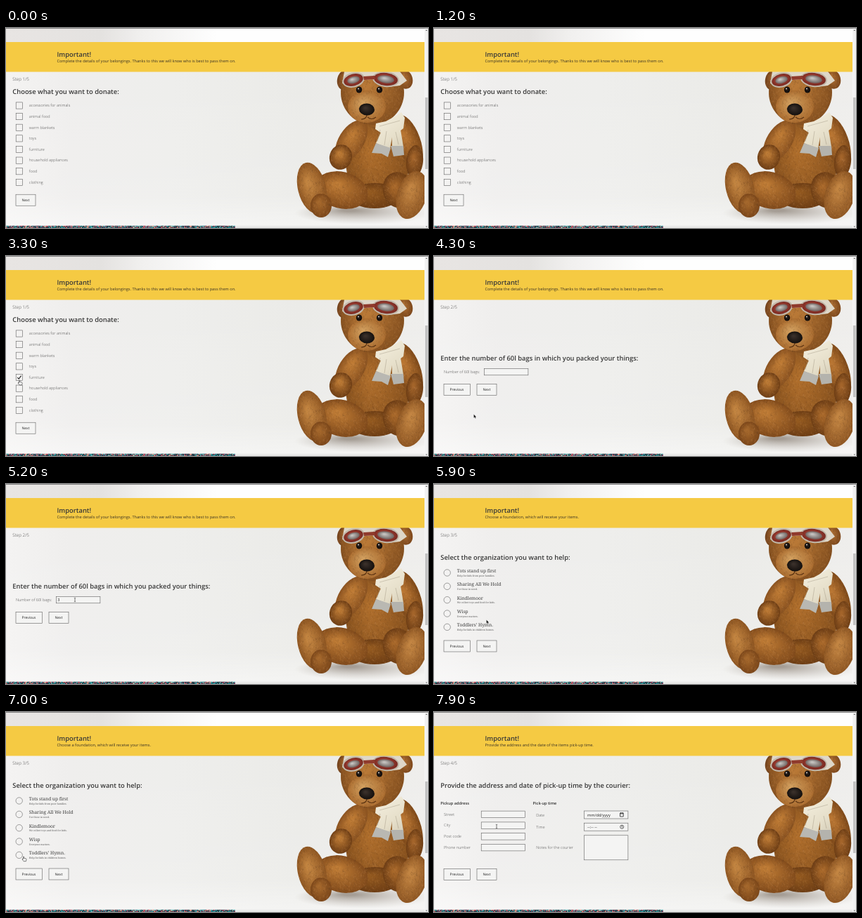
Recreate the animation shown at these times as an HTML page with a canvas. Size 600 by 285 pixels, loop 8 s.

```html
<!DOCTYPE html>
<html lang="en">
<head>
<meta charset="utf-8">
<title>Donation form</title>
<style>
html, body { margin: 0; width: 100%; height: 100%; overflow: hidden; background: #fff; }
canvas, svg { position: absolute; left: 0; top: 0; width: 600px; height: 285px; }
text { font-family: "Open Sans", sans-serif; fill: #333; text-rendering: geometricPrecision; white-space: pre; }
.sub { font-size: 5.625px; fill: #3c3426; }
.step { font-size: 6.25px; font-weight: 300; fill: #444; }
.title { font-size: 9.375px; font-weight: 600; fill: #383838; }
.label { font-size: 5.625px; font-weight: 300; fill: #484848; }
.head { font-size: 5.625px; font-weight: 600; }
.btn { font-size: 5px; fill: #222; }
.field { font-size: 5.625px; fill: #222; }
.org { font-family: "Noto Serif", serif; font-size: 6.5px; font-weight: 300; fill: #3c3c3c; }
.desc { font-family: "Noto Serif", serif; font-size: 3.45px; fill: #555; }
.box { fill: none; stroke: #555; stroke-width: .55; }
.fill { fill: #f4f4f3; }
.tick { fill: none; stroke: #222; stroke-width: 1.1; }
</style>
</head>
<body>
<canvas id="photo"></canvas>
<svg id="page" viewBox="0 0 600 285"></svg>
<script>
const W = 600, H = 285, LOOP = 8000;
const page = document.getElementById('page');
const photo = document.getElementById('photo');
const ratio = Math.max(1, window.devicePixelRatio || 1);

let seed = 7;
const rand = () => (seed = (seed * 16807) % 2147483647) / 2147483647;
const between = (a, b) => a + (b - a) * rand();

function surface(canvas) {
  canvas.width = W * ratio;
  canvas.height = H * ratio;
  const c = canvas.getContext('2d');
  c.scale(ratio, ratio);
  return c;
}

// ---------- backdrop ----------
const g = surface(photo);

function linear(c, x0, y0, x1, y1, stops) {
  const grad = c.createLinearGradient(x0, y0, x1, y1);
  stops.forEach(([at, col]) => grad.addColorStop(at, col));
  return grad;
}

function rect(c, x, y, w, h, fill) {
  c.fillStyle = fill;
  c.fillRect(x, y, w, h);
}

function blob(c, x, y, rx, ry, rot, light, dark) {
  c.save();
  c.translate(x, y);
  c.rotate(rot);
  c.scale(rx, ry);
  const grad = c.createRadialGradient(-.2, -.25, .1, 0, 0, 1);
  grad.addColorStop(0, light);
  grad.addColorStop(1, dark || light);
  c.fillStyle = grad;
  c.beginPath();
  c.arc(0, 0, 1, 0, 7);
  c.fill();
  c.restore();
}

function poly(c, points, fill) {
  c.fillStyle = fill;
  c.beginPath();
  points.forEach(([x, y]) => c.lineTo(x, y));
  c.closePath();
  c.fill();
}

function fur(c) {
  c.save();
  c.globalCompositeOperation = 'source-atop';
  c.lineWidth = .7;
  for (let i = 0; i < 5200; i++) {
    const x = between(410, 596), y = between(62, 275), a = between(.4, 2.4), len = between(1.5, 4);
    c.strokeStyle = rand() < .5 ? 'rgba(70,34,8,.17)' : 'rgba(226,165,92,.17)';
    c.beginPath();
    c.moveTo(x, y);
    c.lineTo(x + Math.cos(a) * len, y + Math.sin(a) * len);
    c.stroke();
  }
  c.restore();
}

function drawBear() {
  const layer = document.createElement('canvas');
  const c = surface(layer);
  const hi = '#bd7a34', mid = '#a3642a', low = '#6d3d14';

  // ears, body, arms, legs
  blob(c, 483, 74, 12, 15, .3, '#a0642f', '#70401a');
  blob(c, 567, 73, 11, 14, -.3, '#b27336', '#7e481c');
  blob(c, 528, 190, 45, 66, -.05, '#ae6d2b', '#85501d');
  blob(c, 524, 239, 36, 18, 0, '#93591f', low);
  blob(c, 491, 161, 18, 33, .55, hi, '#8a5220');
  blob(c, 476, 184, 16, 18, .3, hi, low);
  blob(c, 572, 161, 17, 39, -.35, '#b87532', '#7d4818');
  blob(c, 581, 190, 12, 23, .1, mid, low);
  blob(c, 477, 231, 38, 26, .25, hi, '#824b1b');
  blob(c, 435, 228, 20, 37, -.24, '#c28440', '#8d5521');
  blob(c, 448, 253, 15, 17, 0, '#a5682c', '#7b4619');
  blob(c, 558, 231, 22, 26, -.3, '#a8682a', low);
  blob(c, 577, 238, 21, 35, .3, '#c38542', '#8f5723');

  // head
  blob(c, 521, 92, 45, 46, 0, '#b87836', '#85501f');
  blob(c, 513, 112, 27, 23, -.05, '#d09d5c', '#aa6c2f');
  fur(c);

  // face
  c.strokeStyle = '#5b3312';
  c.lineWidth = 1.2;
  c.beginPath();
  c.moveTo(513, 121);
  c.quadraticCurveTo(514, 130, 505, 130);
  c.moveTo(514, 127);
  c.quadraticCurveTo(520, 132, 526, 127);
  c.stroke();
  blob(c, 513, 116, 11, 8.5, .05, '#3a302a', '#14100e');
  [[502, 88], [531, 88]].forEach(([x, y]) => {
    blob(c, x, y, 4.2, 4.5, 0, '#2c211b', '#0c0908');
    blob(c, x - 1, y - 1.5, .9, .9, 0, '#ddd');
  });

  // goggles
  poly(c, [[481, 62], [560, 62], [570, 75], [560, 82], [545, 84], [523, 73], [510, 74], [497, 83], [478, 79]], '#ded7c9');
  [[494, 74, 14, 8.5, -.25], [540, 73, 17, 9, .12]].forEach(([x, y, rx, ry, a]) => {
    blob(c, x, y, rx + 2, ry + 2, a, '#f1ece0', '#bdb4a5');
    blob(c, x, y, rx, ry, a, '#b4493a', '#792a22');
    blob(c, x, y, rx - 5, ry - 3.5, a, '#c6c4c1', '#6e6360');
  });
  poly(c, [[508, 69], [524, 68], [525, 73], [509, 74]], '#8f3a2c');

  // scarf
  const cream = linear(c, 525, 120, 566, 180, [[0, '#f5f0e0'], [.6, '#e6dfca'], [1, '#d0c8b3']]);
  poly(c, [[526, 136], [540, 133], [553, 126], [562, 120], [567, 128], [565, 143], [556, 150], [534, 150], [525, 144]], cream);
  poly(c, [[536, 142], [551, 144], [546, 172], [533, 167], [526, 164]], cream);
  poly(c, [[548, 143], [561, 145], [565, 169], [549, 168]], cream);
  poly(c, [[526, 164], [547, 171], [543, 184], [534, 179], [520, 178]], '#b9b8b2');
  poly(c, [[547, 168], [565, 168], [566, 181], [551, 183]], '#b4b3ad');
  c.strokeStyle = 'rgba(140,130,110,.45)';
  c.lineWidth = .8;
  [[532, 145, 528, 162], [541, 147, 538, 167], [554, 148, 558, 166], [531, 140, 560, 132]].forEach(([a, b, x, y]) => {
    c.beginPath();
    c.moveTo(a, b);
    c.lineTo(x, y);
    c.stroke();
  });
  g.drawImage(layer, 0, 0, W, H);
}

function drawBackdrop() {
  rect(g, 0, 0, W, H, '#fff');
  rect(g, 0, 0, 595, 20, linear(g, 0, 0, 300, 0, [[0, '#e8e5e3'], [.45, '#e4e2e0'], [.65, '#f1f0ef'], [1, '#fefefe']]));
  rect(g, 0, 62, 595, 220, linear(g, 0, 0, 595, 0,
    [[0, '#f4f3f2'], [.15, '#efeeed'], [.4, '#eeeeec'], [.7, '#ebebe8'], [1, '#efeeec']]));
  rect(g, 0, 62, 595, 220, linear(g, 0, 62, 0, 282, [[0, 'rgba(255,255,255,0)'], [.8, 'rgba(255,255,255,.1)'], [1, 'rgba(255,255,255,.45)']]));

  g.save();
  g.beginPath();
  g.rect(0, 62, 595, 220);
  g.clip();
  blob(g, 508, 264, 98, 16, 0, 'rgba(90,75,60,.5)', 'rgba(160,150,140,0)');
  drawBear();
  g.restore();

  rect(g, 0, 20, 595, 42.5, '#f5ca43');
  rect(g, 0, 281.6, 595, 3.4, '#e9e9e8');
  const tints = ['#1f6f78', '#2a9aa0', '#143b44', '#c0485f', '#6d2c4c', '#57b3b0', '#d98c79', '#28323c'];
  for (let x = 0; x < 325; x += 1.5)
    for (let y = 281.8; y < 285; y += 1.1)
      rect(g, x, y, 1.7, 1.3, tints[Math.floor(rand() * tints.length)]);

  rect(g, 0, 0, W, .8, '#6b6b6b');
  rect(g, 595.3, .8, 4.7, 284.2, '#f1f1f1');
  rect(g, 595.9, 99, 3.6, 102, '#c1c1c1');
  poly(g, [[596.5, 4], [597.8, 2.4], [599, 4]], '#555');
  poly(g, [[596.5, 282.4], [597.8, 284], [599, 282.4]], '#555');
}
drawBackdrop();

// ---------- form ----------
function add(parent, tag, attrs, content) {
  const el = document.createElementNS('http://www.w3.org/2000/svg', tag);
  for (const k in attrs) el.setAttribute(k, attrs[k]);
  if (content) el.textContent = content;
  parent.appendChild(el);
  return el;
}
const say = (p, cls, x, y, s) => add(p, 'text', { class: cls, x, y }, s);
const box = (p, x, y, w, h, cls = 'box') => add(p, 'rect', { class: cls, x, y, width: w, height: h });
const tick = (p, x, y) => add(p, 'path', { class: 'tick', d: `M${x - 2.6} ${y}l2 2.2l3.4 -4.6` });
const show = (el, on) => el.setAttribute('visibility', on ? 'visible' : 'hidden');

function button(p, x, y, w, s) {
  box(p, x, y, w, 16, 'box fill');
  say(p, 'btn', x + 8.6, y + 9.8, s);
}
function pair(p, y) {
  button(p, 14, y, 37.4, 'Previous');
  button(p, 61, y, 28, 'Next');
}

say(page, 'title', 72.4, 41.4, 'Important!');

const general = 'Complete the details of your belongings. Thanks to this we will know who is best to pass them on.';
function newStep(n, note, y, title) {
  const p = add(page, 'g', {});
  say(p, 'sub', 72.4, 49.2, note);
  say(p, 'step', 9.3, 75, `Step ${n}/5`);
  say(p, 'title', 9.3, y, title);
  return p;
}

const s1 = newStep(1, general, 94.2, 'Choose what you want to donate:');
['accessories for animals', 'animal food', 'warm blankets', 'toys', 'furniture', 'household appliances', 'food', 'clothing']
  .forEach((s, i) => {
    const y = 110.5 + i * 15.625;
    box(s1, 14.2, y - 4.6, 9.2, 9.2);
    say(s1, 'label', 32.8, y + 1.8, s);
  });
button(s1, 14, 237.2, 28, 'Next');
const checked = tick(add(s1, 'g', {}), 18.8, 173);

const s2 = newStep(2, general, 149, 'Enter the number of 60l bags in which you packed your things:');
say(s2, 'label', 14, 167, 'Number of 60l bags:');
box(s2, 71.4, 160.4, 62.5, 9.4, 'box fill');
pair(s2, 182.5);
const typed = say(s2, 'field', 73.2, 167.2, '3');

const s3 = newStep(3, 'Choose a foundation, which will receive your items.', 108.4, 'Select the organization you want to help:');
[
  ['Tots stand up first', 'Help for kids from poor families.'],
  ['Sharing All We Hold', 'For those in need.'],
  ['Kindlemoor', 'We collect toys and food for kids.'],
  ['Wisp', 'Everyone matters.'],
  ['Toddlers\u2019 Hymn.', 'Help for kids in children homes.']
].forEach(([name, about], i) => {
  const y = 126.5 + i * 19.35;
  add(s3, 'circle', { class: 'box', cx: 18.7, cy: y, r: 4.7 });
  say(s3, 'org', 32.8, y - .7, name);
  say(s3, 'desc', 32.8, y + 5.2, about);
});
pair(s3, 223);
const picked = tick(add(s3, 'g', {}), 18.7, 204);

const s4 = newStep(4, 'Provide the address and the date of the items pick-up time.', 107.6,
  'Provide the address and date of pick-up time by the courier:');
say(s4, 'head', 9.3, 132, 'Pickup address');
say(s4, 'head', 140.6, 132, 'Pick-up time');
['Street', 'City', 'Post code', 'Phone number'].forEach((s, i) => {
  const y = 145.8 + i * 15.8;
  say(s4, 'label', 14, y + 1.8, s);
  box(s4, 67.2, y - 4.7, 62.5, 9.4, 'box fill');
});
[['Date', 148.5], ['Time', 165.5], ['Notes for the courier', 195]].forEach(([s, y]) => say(s4, 'label', 145.3, y, s));
box(s4, 213.4, 141, 62.5, 11, 'box fill');
box(s4, 213.4, 158.2, 62.5, 11, 'box fill');
box(s4, 213.4, 175.8, 62.5, 35, 'box fill');
say(s4, 'field', 218, 148.5, 'mm/dd/yyyy');
say(s4, 'field', 218, 165.5, '--:-- --');
add(s4, 'path', { d: 'M264.6 144h4.6v5h-4.6zM265.6 143v1M268.2 143v1M264.6 144.9h4.6', fill: 'none', stroke: '#222', 'stroke-width': .8 });
add(s4, 'path', { d: 'M264.7 163.7a2.5 2.5 0 1 0 5 0a2.5 2.5 0 1 0 -5 0M267.2 162v1.8l1 .7', fill: 'none', stroke: '#222', 'stroke-width': .7 });
pair(s4, 223.5);

// ---------- pointer ----------
const pointer = add(page, 'g', {});
const ink = { stroke: '#111', 'stroke-width': .55, 'stroke-linejoin': 'round', fill: '#fff' };
const shapes = {
  arrow: add(pointer, 'path', { d: 'M0 0v5.2l1.2 -1l.9 1.9l.9 -.4l-.8 -1.8h1.6z', fill: '#111', stroke: '#fff', 'stroke-width': .25 }),
  hand: add(pointer, 'path', { ...ink, d: 'M-.6 .3q.6 -.7 1.2 0v2.1l2.6 .5q.9 .2 .8 1.2l-.6 2.6h-3.3l-2 -2.7q-.2 -1 .7 -.7l.6 .6z' }),
  beam: add(pointer, 'path', { ...ink, fill: 'none', d: 'M-1.2 -2.8q1 0 1.2 .6q.2 -.6 1.2 -.6M0 -2.2v4.4M-1.2 2.8q1 0 1.2 -.6q.2 .6 1.2 .6' })
};

// time, x, y
const route = [
  [1200, 598, 30], [1600, 330, 60], [2000, 90, 130], [2500, 30, 169.5], [2900, 19, 172],
  [3200, 19, 172], [3600, 20, 205], [4100, 30, 244], [4300, 56.5, 225.5], [4800, 98, 165],
  [5200, 98, 165], [5700, 74, 190], [5900, 74.5, 193.5], [6300, 75, 194], [7000, 25, 206],
  [7100, 20, 204], [7200, 20, 204], [7500, 74, 231], [7600, 74, 231], [7900, 89, 163], [8000, 89, 163]
];

function pointerAt(t) {
  const i = Math.max(1, route.findIndex(k => k[0] >= t));
  const [t0, x0, y0] = route[i - 1], [t1, x1, y1] = route[i];
  const u = Math.max(0, (t - t0) / (t1 - t0)), e = u * u * (3 - 2 * u);
  return [x0 + (x1 - x0) * e, y0 + (y1 - y0) * e];
}

function pointerKind(step, x, y) {
  const inside = (l, r, t, b) => x > l && x < r && y > t && y < b;
  if (step === 0 && inside(14, 92, 104, 226)) return 'hand';
  if (step === 2 && inside(14, 32, 120, 210)) return 'hand';
  if (step === 1 && inside(71, 134, 160, 170)) return 'beam';
  if (step === 3 && inside(67, 130, 140, 199)) return 'beam';
  return 'arrow';
}

const steps = [s1, s2, s3, s4], starts = [0, 4300, 5900, 7600];

function draw(t) {
  const now = starts.filter(s => t >= s).length - 1;
  steps.forEach((s, i) => s.setAttribute('display', i === now ? 'inline' : 'none'));
  show(checked, t >= 3000);
  show(typed, t >= 5200);
  show(picked, t >= 7100);

  const [x, y] = pointerAt(t), kind = pointerKind(now, x, y);
  pointer.setAttribute('transform', `translate(${x} ${y})`);
  for (const k in shapes) show(shapes[k], t > 1200 && k === kind);
}

const begin = performance.now();
function tickFrame() {
  const t = (performance.now() - begin) % LOOP;
  draw(Math.floor(t / 100) * 100);
  requestAnimationFrame(tickFrame);
}
tickFrame();
</script>
</body>
</html>
```
